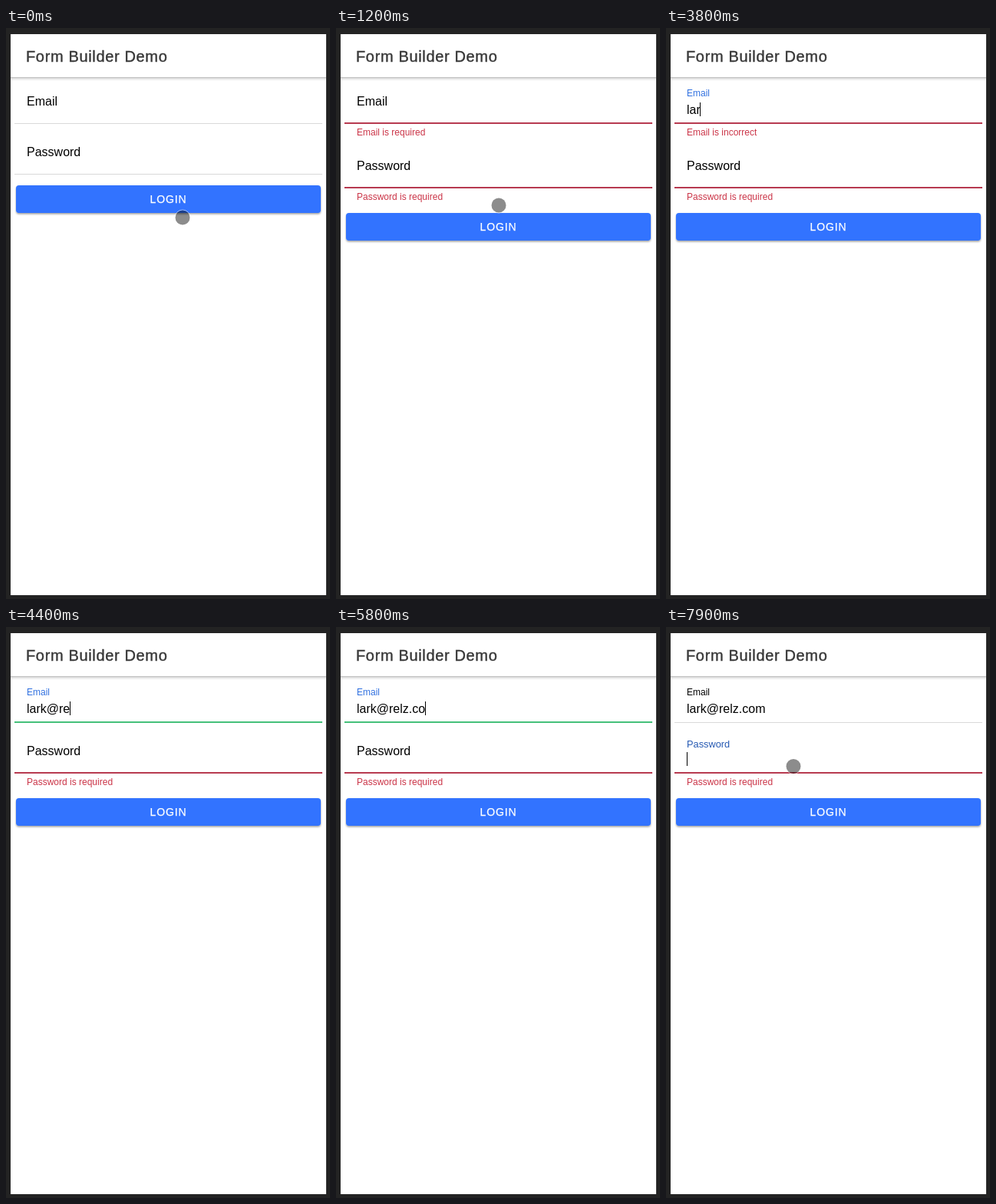
An HTML page for the animation above (8000 ms loop, 422 by 744 pixels).

```html
<!DOCTYPE html>
<html lang="en">
<head>
<meta charset="utf-8">
<title>Form Builder Demo</title>
<style>
html, body { margin: 0; width: 100%; height: 100%; overflow: hidden; background: #232323; }
svg { display: block; width: 100%; height: 100%; }
text { font-family: "Liberation Sans", Arial, sans-serif; font-size: 16px; }
.title { font-size: 20px; letter-spacing: .65px; fill: #383838; stroke: #383838; stroke-width: .4px; }
.login { font-size: 14px; letter-spacing: .86px; fill: #fff; stroke: #fff; stroke-width: .25px; }
.error { font-size: 12px; fill: #cb3548; }
</style>
</head>
<body>
<svg viewBox="0 0 422 744">
  <defs>
    <linearGradient id="shade" x2="0" y2="1">
      <stop stop-color="#000" stop-opacity=".28"/>
      <stop offset=".4" stop-color="#000" stop-opacity=".1"/>
      <stop offset="1" stop-color="#000" stop-opacity="0"/>
    </linearGradient>
    <filter id="lift" x="-5%" y="-20%" width="110%" height="150%">
      <feDropShadow dx="0" dy="1.5" stdDeviation="1.3" flood-color="#000" flood-opacity=".38"/>
    </filter>
  </defs>
  <rect width="422" height="744" fill="#232323"/>
  <rect x="6" y="8" width="411" height="731" fill="#fff"/>
  <rect x="6" y="64" width="411" height="5" fill="url(#shade)"/>
  <text class="title" x="26" y="44">Form Builder Demo</text>

  <rect id="emailLine" x="11" width="401"/>
  <text id="emailLabel" x="27">Email</text>
  <text id="emailValue" x="27" y="112"></text>
  <text id="emailError" class="error" x="27" y="140"></text>

  <g id="password">
    <rect id="passLine" x="11" width="401"/>
    <text id="passLabel" x="27">Password</text>
    <text id="passError" class="error" x="27" y="206">Password is required</text>
  </g>

  <g id="button">
    <rect x="13" y="205" width="397" height="36" rx="4" fill="#3073ff" filter="url(#lift)"/>
    <text class="login" x="187.5" y="228">LOGIN</text>
  </g>

  <rect id="caret" width="1" height="18" fill="#000"/>
  <g id="pointer">
    <circle r="10" fill="none" stroke="#fff" stroke-opacity=".55"/>
    <circle r="9.5" fill="#000" fill-opacity=".45"/>
  </g>
</svg>
<script>
const LOOP = 8000, STEP = 100;
const SUBMIT = 800, EMAIL_FOCUS = 1900, EMAIL_BLUR = 7600, PASS_FOCUS = 7800;
const ADDRESS = 'lark@relz.com';
const keyTimes = [3300, 3500, 3700, 3900, 4200, 4400, 4400, 4700, 5000, 5400, 5600, 5700, 5900];
const RED = '#b73a50', GREEN = '#45c07a', GRAY = '#d9d9d9';

// Pointer path: time, x, y
const path = [
  [100, 230, 247], [600, 210, 229], [1100, 210, 229], [1200, 212, 231],
  [1600, 173, 114], [1900, 171, 109], [6800, 170, 113.5], [7200, 166, 181.5]
];

const el = {};
for (const node of document.querySelectorAll('[id]')) el[node.id] = node;

const clamp = v => Math.min(1, Math.max(0, v));
const mix = (a, b, p) => a + (b - a) * p;
const smooth = p => p * p * (3 - 2 * p);

function set(node, attrs) {
  for (const name in attrs) node.setAttribute(name, attrs[name]);
}

function pointerAt(t) {
  const next = path.findIndex(k => k[0] > t);
  if (next === 0) return path[0].slice(1);
  if (next < 0) return path[path.length - 1].slice(1);
  const a = path[next - 1], b = path[next];
  if (b[0] === 6800) return a.slice(1);
  const p = smooth((t - a[0]) / (b[0] - a[0]));
  return [mix(a[1], b[1], p), mix(a[2], b[2], p)];
}

function drawLabel(node, base, t, focus, blur) {
  const p = 1 - (1 - clamp((t - focus) / 200)) ** 2.3;
  const tint = t >= blur ? 0 : p;
  const rgb = [49, 113, 224].map(c => Math.round(c * tint));
  node.style.fontSize = mix(16, 12, p) + 'px';
  set(node, { y: mix(base, base - 12, p), fill: `rgb(${rgb})` });
}

function drawLine(node, base, color) {
  const thin = color === GRAY;
  set(node, { y: thin ? base : base - 1, height: thin ? 1 : 2, fill: color });
}

function emailError(t, typed) {
  if (t < SUBMIT) return '';
  if (!typed) return 'Email is required';
  return /^\w+@\w+(\.\w+)?$/.test(typed) ? '' : 'Email is incorrect';
}

function draw(t) {
  const strokes = keyTimes.filter(k => k <= t);
  const typed = ADDRESS.slice(0, strokes.length);
  const error = emailError(t, typed);
  const submitted = t >= SUBMIT;
  const emailShift = error ? 18 : 0;

  el.emailValue.textContent = typed;
  el.emailError.textContent = error;
  drawLabel(el.emailLabel, 101, t, EMAIL_FOCUS, EMAIL_BLUR);
  drawLabel(el.passLabel, 167, t, PASS_FOCUS, LOOP);
  drawLine(el.emailLine, 124, !submitted || t >= EMAIL_BLUR ? GRAY : error ? RED : GREEN);
  drawLine(el.passLine, 190, submitted ? RED : GRAY);
  set(el.passError, { visibility: submitted ? 'visible' : 'hidden' });
  set(el.password, { transform: `translate(0 ${emailShift})` });
  set(el.button, { transform: `translate(0 ${emailShift + (submitted ? 18 : 0)})` });

  const inPass = t >= PASS_FOCUS;
  const focused = inPass || (t >= EMAIL_FOCUS && t < EMAIL_BLUR);
  const lastInput = inPass ? PASS_FOCUS : strokes[strokes.length - 1] || EMAIL_FOCUS;
  const lit = focused && Math.floor((t - lastInput) / 500) % 2 === 0;
  const width = inPass || !typed ? 0 : el.emailValue.getComputedTextLength();
  set(el.caret, {
    x: 27 + Math.floor(width),
    y: inPass ? 163 : 97,
    visibility: lit ? 'visible' : 'hidden'
  });

  const hidden = t >= keyTimes[0] && t < 6800;
  set(el.pointer, {
    transform: `translate(${pointerAt(t).join(' ')})`,
    visibility: hidden ? 'hidden' : 'visible'
  });
}

const start = performance.now();
function tick() {
  const t = (performance.now() - start) % LOOP;
  draw(Math.floor(t / STEP) * STEP);
  requestAnimationFrame(tick);
}
tick();
</script>
</body>
</html>
```
